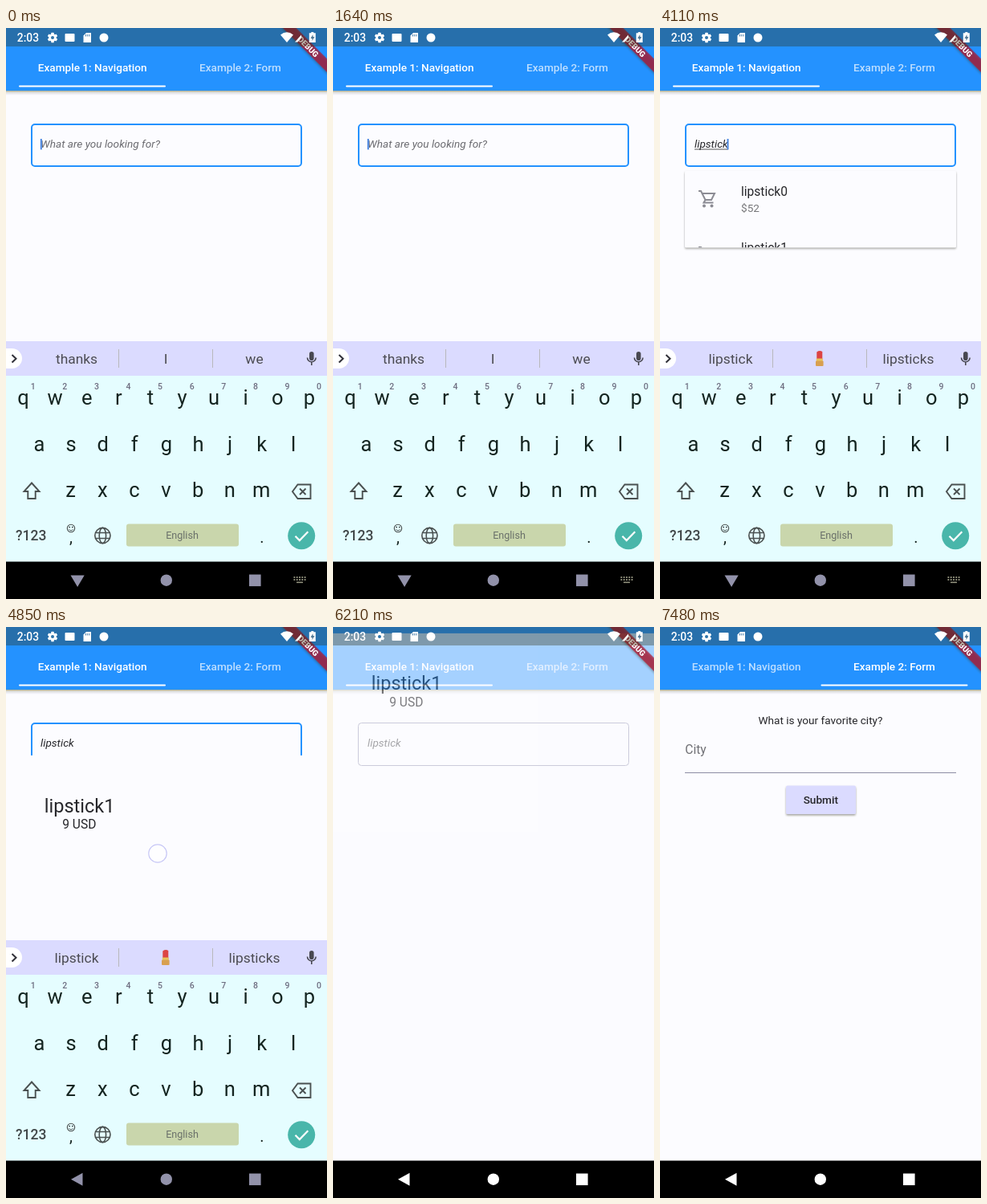
An HTML page that plays this animation: 400x711 px, repeating every 8000 ms.

```html
<!DOCTYPE html>
<html lang="en">
<head>
<meta charset="utf-8">
<title>Search field demo</title>
<style>
html, body { margin: 0; width: 100%; height: 100%; overflow: hidden; background: #000; }
svg { display: block; width: 100vw; height: 100vh; }
text { font-family: Roboto, "Open Sans", sans-serif; white-space: pre; }
</style>
</head>
<body>
<svg id="stage" viewBox="0 0 400 711"></svg>
<script>
const LOOP = 8000;
const BLUE = '#2492ff', PAPER = '#fcfcff', INK = '#26262a', KEY = '#142420';
const WORD = 'lipstick';
const KEY_TIMES = [1810, 1970, 2140, 2260, 2470, 2630, 2710, 2790];
const HINTS = [
  ['thanks', 'I', 'we'], ['love', 'l', 'like'], ['like', 'li', 'life'],
  ['lip', 'lips', 'lips'], ['lips', 'lip', 'lips'], ['lipst', 'lips', 'lipstick'],
  ['lipstick', 'lipsti', 'lipsticks'], ['lipstick', '', 'lipsticks'], ['lipstick', '', 'lipsticks']
];
const AT = {
  loading: 3070, results: 4070, tap: 4770, open: 4816, hideKeys: 4880,
  blur: 4900, back: 6120, tab: 7140
};

// ---- markup helpers
const text = (x, y, size, str, more = '') =>
  `<text x="${x}" y="${y}" font-size="${size}" ${more}>${str}</text>`;
const mid = (x, y, size, str, more = '') => text(x, y, size, str, 'text-anchor="middle" ' + more);
const rect = (x, y, w, h, fill, more = '') =>
  `<rect x="${x}" y="${y}" width="${w}" height="${h}" fill="${fill}" ${more}/>`;
const circle = (x, y, r, more = '') => `<circle cx="${x}" cy="${y}" r="${r}" ${more}/>`;
const path = (d, more = '') => `<path d="${d}" ${more}/>`;
const line = (color, w) => `fill="none" stroke="${color}" stroke-width="${w}"`;

// ---- parts of the screen
function searchPage() {
  return `<g id="search">
    <rect id="border" rx="4" fill="none"/>
    ${text(43, 149.4, 13.6, 'What are you looking for?', 'id="prompt" font-style="italic" fill="#6b6b70"')}
    ${text(43, 149.4, 13.6, '', `id="typed" font-style="italic" fill="${INK}"`)}
    ${rect(43, 150.6, 0, 0.8, INK, 'id="composing"')}
    ${rect(43, 138, 2, 13.4, '#4a86e0', 'id="cursor"')}
  </g>`;
}

function formPage() {
  return `<g id="form">
    ${mid(200, 121.4, 13.6, 'What is your favorite city?', `fill="${INK}"`)}
    ${text(31.3, 158.4, 15.57, 'City', 'fill="#707075"')}
    ${rect(31, 181, 338, 1, '#8c8ca4')}
    ${rect(157, 197.5, 87, 35.5, '#dbdbff', 'rx="2" filter="url(#soft)"')}
    ${mid(200.3, 219.8, 13.6, 'Submit', `font-weight="500" fill="${INK}"`)}
  </g>`;
}

function appBar() {
  const label = (x, str, id) => mid(x, 54, 13.6, str, `id="${id}" font-weight="500" fill="#fff"`);
  return rect(0, 78, 400, 6, 'url(#under)') + rect(0, 0, 400, 78, BLUE) +
    label(107.7, 'Example 1: Navigation', 'tab1') + label(292, 'Example 2: Form', 'tab2') +
    rect(16, 71.4, 183, 2.2, '#fff', 'id="mark" rx="1"');
}

function cartRow(i, price) {
  const y = 178 + 70 * i;
  const cart = 'M1 2h3l5.5 11h7.5l4-8H6M9.5 13l-2 3.5h12';
  return `<g transform="translate(47 ${y + 23})">${path(cart, line('#8c8c94', 2))}
    ${circle(8, 20.5, 2, 'fill="#8c8c94"')}${circle(17.5, 20.5, 2, 'fill="#8c8c94"')}</g>` +
    text(101, y + 31, 15.57, WORD + i, `fill="${INK}"`) +
    text(101, y + 50.6, 13.6, '$' + price, 'fill="#757578"');
}

function dropdown() {
  return `<g id="drop">
    ${rect(31, 178, 338, 52, PAPER, 'id="panel" rx="1.5" filter="url(#soft)"')}
    ${path('', `id="spinner" ${line(BLUE, 3.9)} stroke-linecap="square"`)}
    <g id="rows" clip-path="url(#cut)">${[52, 9, 37].map((p, i) => cartRow(i, p)).join('')}</g>
  </g>`;
}

function sheet() {
  return `<g id="sheet">${rect(0, 0, 400, 690, PAPER)}
    ${mid(91.6, 70.6, 23.5, 'lipstick1', `fill="${INK}"`)}
    ${mid(91.3, 91, 15.57, '9 USD', `fill="${INK}"`)}</g>`;
}

function banner() {
  return `<g transform="translate(400 0) rotate(45)">
    ${rect(-60, 27.2, 120, 11.7, '#ac1630', 'fill-opacity=".76" filter="url(#soft)"')}
    ${mid(0, 36.6, 9.9, 'DEBUG', 'font-weight="900" fill="#fff"')}</g>`;
}

function gear(x, y) {
  const teeth = [0, 60, 120].map(a =>
    rect(x - 1.7, y - 6.3, 3.4, 12.6, '#fff', `rx=".6" transform="rotate(${a} ${x} ${y})"`)).join('');
  return teeth + circle(x, y, 3.4, line('#fff', 2.8)) + circle(x, y, 2, 'fill="#2f74aa"');
}

function statusBar() {
  return rect(0, 0, 400, 23, '#302800', 'fill-opacity=".33"') +
    text(13.8, 17, 13.8, '2:03', 'font-weight="500" fill="#fff"') + gear(58, 12) +
    rect(73.5, 7, 12, 10, '#fff', 'rx="1"') +
    path('M100 6h6v12H96.500V9.500Z', 'fill="#fff"') +
    path('M99.500 8v2.500M101.700 8v2.500M103.900 8v2.500', line('#4a7fab', 1)) +
    circle(122, 12, 5.5, 'fill="#fff"') +
    path('M342 8.500Q350 2 358 8.500L350 18Z', 'fill="#fff"') +
    path('M360 17.500L368 8.500V11.500L363.500 17.500Z', 'fill="#fff"') +
    path('M380.300 5h3v1.300h2.500V18h-8V6.300h2.500Z', 'fill="#fff"') +
    path('M382.500 8l-3 5h2v3l3-5h-2Z', 'fill="#4f7795"');
}

function emoji() {
  return `<g id="emoji">${path('M195.300 413v-9.500q3.500-2.500 7-.5v10Z', 'fill="#dc4444"')}
    ${rect(194.8, 411.5, 8, 3.5, '#e8c45c')}${rect(194, 414.5, 9.6, 6.5, '#d8a050', 'rx="1"')}</g>`;
}

function keyRow(letters, x, y) {
  return [...letters].map((c, i) => mid(x + 39.6 * i, y, 25.5, c, `fill="${KEY}"`)).join('');
}

function keyboard() {
  const digits = [...'1234567890'].map((d, i) =>
    mid(33.7 + 39.6 * i, 450, 10.5, d, 'font-weight="500" fill="#6d6d80"')).join('');
  const words = [88, 199, 309.5].map((x, i) =>
    mid(x, 418, 17.4, '', `id="word${i}" fill="#4b4b52"`)).join('');
  const pen = line('#4a5050', 1.9);
  return `<g id="keys">
    ${rect(0, 390, 400, 275, '#e5fdff')}${rect(0, 390, 400, 43, '#dbdbff')}
    ${rect(-14, 399, 34, 25, '#fff', 'rx="12.5"')}
    ${path('M7.500 407l5 4.700-5 4.700', line('#303038', 2))}
    ${rect(140, 400, 1, 23, '#b8b8bc')}${rect(257, 400, 1, 23, '#b8b8bc')}
    ${words}${emoji()}
    ${rect(378, 403, 5.6, 11, '#484850', 'rx="2.8"')}
    ${path('M375.500 410.500a5.300 5.300 0 0 0 10.600 0M380.800 416v4', line('#484850', 1.6))}
    ${digits}${keyRow('qwertyuiop', 21.5, 469.1)}${keyRow('asdfghjkl', 41.4, 526.5)}${keyRow('zxcvbnm', 80.7, 584.2)}
    ${path('M32 566.500L41.500 577H36.700V586H27.300V577H22.500Z', pen)}
    ${path('M363.500 568.500H379.500V586H363.500L357 577.200ZM366 573.500l7.500 7.500M373.500 573.500l-7.500 7.500', pen)}
    ${text(12, 638, 17.5, '?123', 'font-weight="500" fill="#42484a"')}
    ${circle(81, 623, 4.7, line('#4a5050', 1.1))}
    ${path('M78.300 624.200q2.700 3.400 5.400 0', line('#4a5050', 1))}
    ${circle(79.2, 621.5, 0.8)}${circle(82.8, 621.5, 0.8)}
    ${mid(81, 640.5, 20, ',', `fill="${KEY}"`)}
    <g ${line('#4a5050', 1.6)}>${circle(120.4, 632, 9.6)}
      <ellipse cx="120.4" cy="632" rx="4.2" ry="9.6"/>${path('M112 628.500h17M112 635.500h17')}</g>
    ${rect(150, 617.5, 140, 28, '#c9d6ac', 'rx="3"')}
    ${mid(219.5, 636.4, 12.6, 'English', 'fill="#6a706a"')}
    ${mid(319, 640.8, 20, '.', `fill="${KEY}"`)}
    ${circle(368.2, 632.3, 17, 'fill="#49b6aa"')}
    ${path('M360.500 632.800l5.300 5.300 10.500-10.800', line('#fff', 2.2))}
  </g>`;
}

function navBar() {
  const gray = '#90907c';
  const dots = [684, 687].map(y =>
    path(`M358.500 ${y}h15`, line(gray, 1.8) + ' stroke-dasharray="1.8 1.5"')).join('');
  return rect(0, 664.5, 400, 47, '#000') +
    `<g id="nav"><path id="navBack"/>${circle(199.8, 687.7, 7.2)}${path('M303 680.500h14.600v14.600h-14.600Z')}</g>
    <g id="switch">${dots}${path('M362 690.300h8', line(gray, 1.6))}</g>`;
}

const stage = document.getElementById('stage');
stage.innerHTML = `<defs>
  <linearGradient id="under" x2="0" y2="1"><stop stop-color="#88885c" stop-opacity=".8"/>
    <stop offset=".3" stop-color="#a8a890" stop-opacity=".4"/><stop offset="1" stop-color="#b0b0e0" stop-opacity="0"/></linearGradient>
  <filter id="soft" x="-20%" y="-20%" width="140%" height="150%">
    <feDropShadow dx="0" dy="1.6" stdDeviation="1.3" flood-color="#303020" flood-opacity=".45"/></filter>
  <clipPath id="cut"><rect id="cutBox" x="31" y="178" width="338" height="0"/></clipPath>
  </defs>` + rect(0, 0, 400, 711, PAPER) + searchPage() + formPage() + appBar() + dropdown() +
  sheet() + banner() + statusBar() + keyboard() + navBar() +
  circle(189, 282, 11.2, 'id="touch" fill="#fff" fill-opacity=".6" stroke="#c6c6f6" stroke-width="1.2"');

const el = {};
stage.querySelectorAll('[id]').forEach(n => el[n.id] = n);

// ---- motion helpers
const clamp = v => Math.max(0, Math.min(1, v));
const span = (t, start, length) => clamp((t - start) / length);
const lerp = (a, b, p) => a + (b - a) * p;
function bezier(x1, y1, x2, y2) {
  const f = (a, b, s) => 3 * a * s * (1 - s) ** 2 + 3 * b * s * s * (1 - s) + s ** 3;
  return x => {
    let lo = 0, hi = 1;
    for (let i = 0; i < 24; i++) {
      const m = (lo + hi) / 2;
      if (f(x1, x2, m) < x) lo = m; else hi = m;
    }
    return x <= 0 ? 0 : x >= 1 ? 1 : f(y1, y2, lo);
  };
}
const swift = bezier(.4, 0, .2, 1), ease = bezier(.25, .1, .25, 1), easeIn = bezier(.42, 0, 1, 1);

const set = (node, attrs) => { for (const k in attrs) node.setAttribute(k, attrs[k]); };
const show = (node, on) => { node.style.display = on ? '' : 'none'; };
const put = (node, str) => { if (node.textContent !== str) node.textContent = str; };

function drawBorder(active) {
  const w = active ? 2 : 1;
  set(el.border, {
    x: 31 + w / 2, y: 119 + w / 2, width: 338 - w, height: 54 - w,
    stroke: active ? BLUE : '#8484a6', 'stroke-width': w
  });
}

function drawField(t) {
  const count = KEY_TIMES.filter(k => k <= t).length;
  const focus = t < AT.open;
  put(el.typed, WORD.slice(0, count));
  show(el.prompt, !count);
  const width = count ? el.typed.getComputedTextLength() : 0;
  const sinceBlink = count ? t - KEY_TIMES[count - 1] : t + 400;
  set(el.composing, { width: focus ? width : 0 });
  set(el.cursor, { x: 42.8 + width - (count ? 1 : 0) });
  show(el.cursor, focus && sinceBlink % 1000 < 500);
  drawBorder(t < AT.blur);

  HINTS[count].forEach((w, i) => put(el['word' + i], w));
  show(el.emoji, !HINTS[count][1]);
}

function drawSpinner(t) {
  const p = clamp((t - AT.loading) / 1333);
  const head = swift(clamp(p * 2)), tail = swift(clamp(p * 2 - 1));
  const from = Math.PI * (-.5 + tail * 1.5 + p * 1.7);
  const to = from + Math.max((head - tail) * 1.5 * Math.PI, .01);
  const at = a => `${200 + 17.5 * Math.cos(a)} ${203.3 + 17.5 * Math.sin(a)}`;
  set(el.spinner, { d: `M${at(from)}A17.5 17.5 0 ${to - from > Math.PI ? 1 : 0} 1 ${at(to)}` });
}

function drawDropdown(t) {
  const loaded = t >= AT.results;
  show(el.drop, t >= AT.loading && t < AT.open);
  show(el.spinner, !loaded);
  show(el.rows, loaded);
  const height = loaded ? 210 * swift(clamp(.25 + (t - AT.results) / 500)) : 52;
  set(el.panel, { height });
  set(el.cutBox, { height });
  drawSpinner(t);
  show(el.touch, t >= AT.tap && t < AT.tap + 110);
}

function drawSheet(t) {
  const out = span(t, AT.back, 340);
  const shown = out > 0 ? 1 - out : span(t, AT.open, 300);
  show(el.sheet, shown > 0);
  set(el.sheet, {
    transform: `translate(0 ${166 * (1 - swift(shown))})`,
    opacity: out > 0 ? easeIn(shown) : 1
  });
}

function drawSystem(t) {
  const hide = span(t, AT.hideKeys, 150);
  show(el.keys, hide < 1);
  set(el.keys, { transform: `translate(0 ${275 * easeIn(hide)})`, opacity: 1 - .5 * hide });
  const typing = t < AT.open + 20;
  show(el.switch, typing);
  set(el.nav, { fill: t < AT.back ? '#9292aa' : '#fff' });
  set(el.navBack, { d: typing ? 'M80.500 681.500H97.700L89.100 696Z' : 'M81 687.700L95.500 679.800V695.800Z' });
}

function drawTabs(t) {
  const p = ease(span(t, AT.tab, 310));
  set(el.search, { transform: `translate(${-400 * p} 0)` });
  set(el.form, { transform: `translate(${400 * (1 - p)} 0)` });
  show(el.form, p > 0);
  set(el.mark, { x: lerp(16, 200.5, p) });
  set(el.tab1, { 'fill-opacity': lerp(1, .7, p) });
  set(el.tab2, { 'fill-opacity': lerp(.7, 1, p) });
}

function draw(t) {
  drawField(t);
  drawDropdown(t);
  drawSheet(t);
  drawSystem(t);
  drawTabs(t);
}

const begin = performance.now();
function tick(now) {
  draw(Math.max(0, now - begin) % LOOP);
  requestAnimationFrame(tick);
}
draw(0);
requestAnimationFrame(tick);
</script>
</body>
</html>
```
